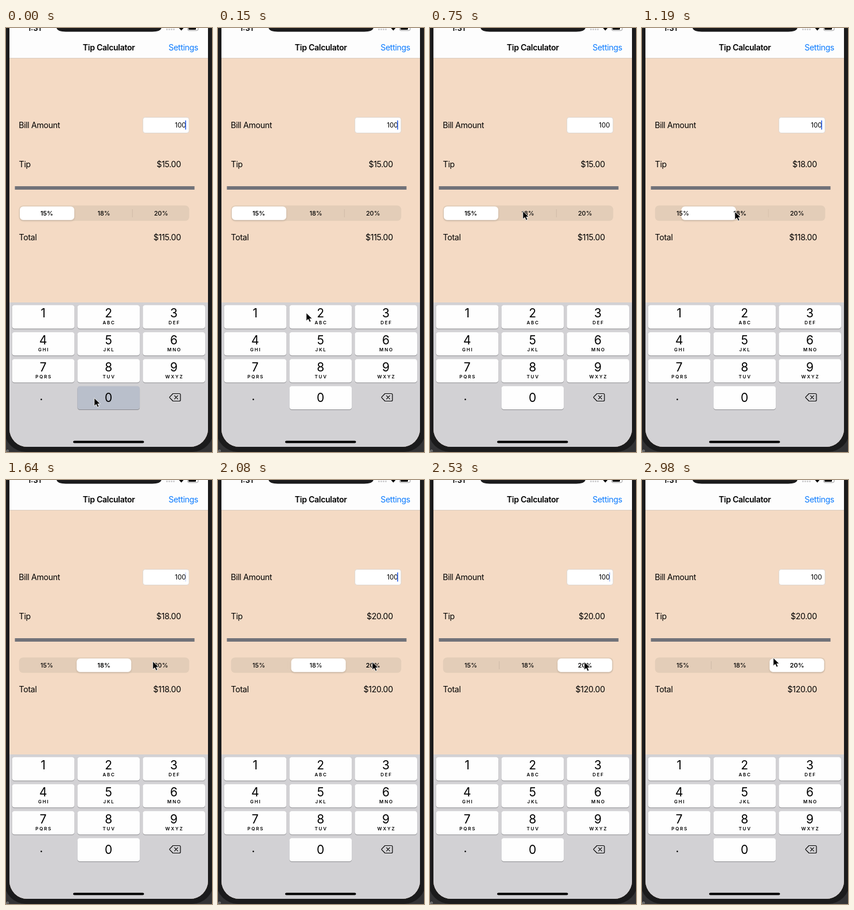
These frames come from a looping animation (359x737 px, 3080 ms). An HTML page:

```html
<!DOCTYPE html>
<html lang="en">
<head>
<meta charset="utf-8">
<title>Tip Calculator</title>
<style>
  html, body { margin: 0; width: 100%; height: 100%; overflow: hidden; background: #1b1b1c; }
  svg { display: block; width: 100%; height: 100%; }
  text { font: 14.2px Inter, Roboto, sans-serif; letter-spacing: -.36px; white-space: pre; }
  .mid { text-anchor: middle; }
  .end { text-anchor: end; }
  .field { font-size: 11.7px; letter-spacing: -.1px; }
  .rate { font-size: 10.9px; letter-spacing: 0; text-anchor: middle; font-weight: 500; }
  .rate.on { font-weight: 600; }
  .digit { font-size: 21px; letter-spacing: 0; text-anchor: middle; }
  .letters { font-size: 8px; font-weight: 600; letter-spacing: 1.8px; text-anchor: middle; }
</style>
</head>
<body>
<svg viewBox="0 0 359 737">
  <defs>
    <clipPath id="screen"><rect x="6" y="-60" width="346" height="788" rx="31"/></clipPath>
    <filter id="soft" x="-10%" y="-20%" width="120%" height="150%">
      <feDropShadow dx="0" dy="1.5" stdDeviation="1.7" flood-opacity=".16"/>
    </filter>
  </defs>

  <rect width="359" height="737" fill="#333335"/>
  <text x="0" y="738" style="font-size:9px" fill="#aaa">e</text>
  <rect x="-3" y="-60" width="365" height="797" rx="38" fill="#1b1b1c"/>

  <g clip-path="url(#screen)">
    <rect width="359" height="737" fill="#f4dac4"/>
    <rect width="359" height="52" fill="#fdfdfd"/>
    <rect y="52" width="359" height=".6" fill="#c9c1bb"/>

    <!-- status bar -->
    <path d="M82-2Q88-2 88 0Q90 6.5 104 6.5H255Q269 6.5 271 0Q271-2 277-2Z" fill="#1b1b1c"/>
    <text x="49.5" y="5" class="mid" style="font-size:13px;font-weight:600;letter-spacing:0">1:31</text>
    <g fill="#c8c8ca">
      <circle cx="280.5" cy="2.5" r="1.4"/><circle cx="284.5" cy="2.5" r="1.4"/>
      <circle cx="288.5" cy="2.5" r="1.4"/><circle cx="292.5" cy="2.5" r="1.4"/>
    </g>
    <path d="M301.5 0Q305.5-2.5 309.5 0L305.5 4.5Z"/>
    <rect x="316.5" y="-5" width="18.5" height="9.5" rx="2.5" fill="none" stroke="#98989a"/>
    <rect x="318" y="-4" width="13" height="7" rx="1.3"/>

    <text x="179.2" y="39" class="mid" style="font-weight:600">Tip Calculator</text>
    <text x="335" y="39" class="end" fill="#0a7aff">Settings</text>

    <text x="22.3" y="173.5">Bill Amount</text>
    <rect x="238.6" y="155.3" width="80.4" height="27.2" rx="4" fill="#fff" stroke="#d6d0cb" stroke-width=".8"/>
    <text x="313.5" y="173" class="end field">100</text>
    <rect id="caret" x="312.2" y="160.5" width="1.7" height="16.3" rx=".8" fill="#3566e8"/>

    <text x="22.6" y="242">Tip</text>
    <text id="tip" x="304.8" y="241.5" class="end"></text>
    <rect x="15.5" y="275" width="313" height="6" fill="#717279"/>
    <text x="22.6" y="368.5">Total</text>
    <text id="total" x="304.8" y="368.5" class="end"></text>

    <!-- tip rate selector -->
    <rect x="22.7" y="308.5" width="296.6" height="26.8" rx="7" fill="#e3cdb8"/>
    <rect id="dividerLeft" x="120.2" y="315" width=".9" height="14" fill="#cdb8a6"/>
    <rect id="dividerRight" x="219.8" y="315" width=".9" height="14" fill="#cdb8a6"/>
    <rect id="thumb" y="310.2" width="95" height="23.5" rx="6" fill="#fff" filter="url(#soft)"/>
    <text x="71" y="326" class="rate">15%</text>
    <text x="170.6" y="326" class="rate">18%</text>
    <text x="270.2" y="326" class="rate">20%</text>

    <!-- keyboard -->
    <rect y="477" width="359" height="260" fill="#d2d1d4"/>
    <g id="keys"></g>
    <text x="61.5" y="647" class="digit">.</text>
    <g fill="none" stroke="#000" stroke-width="1.2" stroke-linecap="round" stroke-linejoin="round">
      <path d="M291 635.5H302Q304 635.5 304 637.5V646.5Q304 648.5 302 648.5H291L285.3 642.7Q284.7 642 285.3 641.3Z"/>
      <path d="M293.7 639.2L299.3 644.8M299.3 639.2L293.7 644.8"/>
    </g>
    <rect x="117" y="717.4" width="123.5" height="4.2" rx="2.1"/>
  </g>

  <path id="pointer" d="M.8 1.2V15.2L4.2 12.2L6.6 17.3L9.1 16.1L6.8 11.3H11.3Z" stroke="#fff" stroke-width=".9"/>
</svg>
<script>
const LOOP = 3080, BILL = 100;
const RATES = [15, 18, 20];
const TAPS = [1121, 2065];
const THUMB_START = 24, SEGMENT = 99.2;

// One entry per screen refresh: pointer x, pointer y, caret opacity
const POSES = [
  [153, 642, 1], [153, 494, 1], [144, 327, 1], [149, 307, 1], [154, 310, .5],
  [161, 317, 0], [161, 319, 0], [161, 318, .5], [161, 318, 1], [178, 320, 1],
  [238, 321, 1], [255, 314, .2], [262, 314, 0], [267, 315, 0], [268, 315, 1],
  [268, 315, 1], [268, 315, 1], [268, 315, .4], [258, 311, 0], [240, 307, 0],
  [228, 308, 0]
];

const $ = id => document.getElementById(id);
const rateLabels = document.querySelectorAll('.rate');

function drawKey(digit, letters, column, row) {
  const x = 10.6 + column * 113.9, y = 481.8 + row * 46.9, middle = x + 54.2;
  const box = `x="${x}" width="108.6" height="40.6" rx="4.2"`;
  $('keys').innerHTML += `
    <rect ${box} y="${y + 1}" fill="#8b8b8f"/>
    <rect ${box} y="${y}" fill="#fefefe" id="key${digit}"/>
    <text class="digit" x="${middle}" y="${y + (letters ? 21.6 : 27.4)}">${digit}</text>
    <text class="letters" x="${middle + .9}" y="${y + 33.6}">${letters}</text>`;
}
['', 'ABC', 'DEF', 'GHI', 'JKL', 'MNO', 'PQRS', 'TUV', 'WXYZ'].forEach((letters, i) =>
  drawKey(i + 1, letters, i % 3, Math.floor(i / 3)));
drawKey(0, '', 1, 3);
// The bare "1" sits level with its neighbours
document.querySelector('#keys .digit').setAttribute('y', 503.4);

// Critically damped spring from 0 to 1
function spring(elapsed) {
  const a = Math.max(0, elapsed) * .0221;
  return 1 - (1 + a) * Math.exp(-a);
}

function render(time) {
  // The screen refreshes every 150 ms, restarting its beat every 1040 ms
  const beat = Math.floor(time / 1040), step = Math.floor(time % 1040 / 150);
  const t = beat * 1040 + step * 150;
  const [x, y, caret] = POSES[beat * 7 + step];
  const [first, second] = TAPS.map(tap => spring(t - tap));
  const selected = TAPS.filter(tap => t >= tap).length;
  const tip = BILL * RATES[selected] / 100;

  $('pointer').setAttribute('transform', `translate(${x} ${y})`);
  $('caret').setAttribute('opacity', caret);
  $('key0').setAttribute('fill', t < 150 ? '#b9bfcb' : '#fefefe');
  $('thumb').setAttribute('x', THUMB_START + SEGMENT * (first + second));
  $('dividerLeft').setAttribute('opacity', second);
  $('dividerRight').setAttribute('opacity', 1 - first);
  $('tip').textContent = '$' + tip.toFixed(2);
  $('total').textContent = '$' + (BILL + tip).toFixed(2);
  rateLabels.forEach((label, i) => label.classList.toggle('on', i === selected));
}

const start = performance.now();
function tick() {
  render((performance.now() - start) % LOOP);
  requestAnimationFrame(tick);
}
tick();
</script>
</body>
</html>
```
